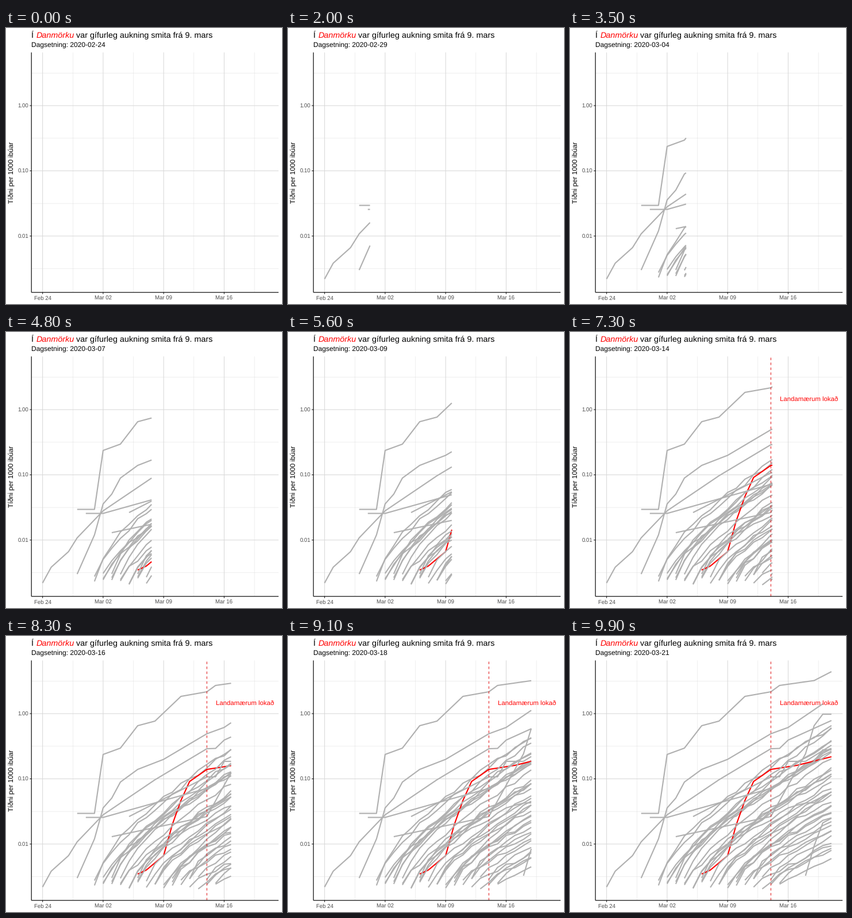
Animation, 480 px wide and 480 px high, one loop 10000 ms. Source, as a matplotlib script:

```python
import numpy as np
import matplotlib.pyplot as plt
from matplotlib.animation import FuncAnimation

plt.rcParams["font.family"] = "Liberation Sans"
plt.rcParams["text.hinting"] = "none"
plt.rcParams["path.snap"] = False

FRAMES, LAST_DAY, CLOSED = 100, 26, 19
LEFT, RIGHT, TOP, BOTTOM = 44.2, 474, 42.5, 459.8
X0, DAY = 63.6, 15.04      # position of Feb 24 and width of one day
Y1, DECADE = 135, 113.4    # height of 1.00 and distance per power of ten
GREY, RED, GRID = "#b0b0b0", "#ff0000", "#d9d9d9"
COUNTRIES = 37
rng = np.random.default_rng(24)

fig = plt.figure(figsize=(480 / 72, 480 / 72), dpi=72, facecolor="white")
ax = fig.add_axes([0, 0, 1, 1])
ax.set(xlim=(0, 480), ylim=(480, 0))
ax.axis("off")


def x_of(day):
    return X0 + DAY * day


def stroke(xs, ys, color, width, z, **kw):
    return ax.plot(xs, ys, color=color, lw=width, zorder=z,
                   solid_capstyle="butt", **kw)[0]


def label(x, y, s, size, color="black", **kw):
    return ax.text(x, y, s, fontsize=size, color=color, zorder=9, **kw)


def vline(x, *style):
    stroke([x, x], [TOP, BOTTOM], *style)


def hline(y, *style):
    stroke([LEFT, RIGHT], [y, y], *style)


# Grid, axes and tick labels
for i in range(4):
    vline(x_of(7 * i + 3.5), GRID, 0.43, 1)
    hline(Y1 + DECADE * (i - 0.5), GRID, 0.43, 1)
for i, name in enumerate(["Feb 24", "Mar 02", "Mar 09", "Mar 16"]):
    x = x_of(7 * i)
    vline(x, GRID, 1.07, 2)
    stroke([x, x], [BOTTOM, BOTTOM + 3], "#333333", 1.16, 7)
    label(x, 472.6, name, 9.6, "#4d4d4d", ha="center")
for i, name in enumerate(["1.00", "0.10", "0.01"]):
    y = Y1 + DECADE * i
    hline(y, GRID, 1.07, 2)
    stroke([LEFT - 3, LEFT], [y, y], "#333333", 1.16, 7)
    label(39.4, y + 3.8, name, 9.6, "#4d4d4d", ha="right")
vline(LEFT, "black", 1.16, 8)
hline(BOTTOM, "black", 1.16, 8)

# Titles
label(44, 17, "Í", 14.4)
label(52.2, 17, "Danmörku", 14.4, RED, style="italic")
label(122.4, 17, "var gífurleg aukning smita frá 9. mars", 14.4)
date = label(44, 34, "", 12)
label(14, 251.5, "Tíðni per 1000 ibúar", 12, rotation=90,
      rotation_mode="anchor", ha="center")

curves = []


def add(days, ys, color=GREY, z=5):
    line = stroke([], [], color, 2.13, z)
    curves.append((line, np.array(days, float), np.array(ys, float)))


def through(*points, **kw):
    """Curve through a few (day, height) points."""
    add(*zip(*points), **kw)


# Curves that stand out from the crowd
through((4, 308.5), (6, 308.5), (7, 206), (9, 195), (11, 156), (13, 148),
        (16, 105), (19, 97), (20, 86), (24, 77.5), (26, 62))
through((4, 421), (6, 353), (7, 299), (8, 282), (9, 254), (11, 232),
        (14, 214.5), (19, 170), (21, 159), (25, 118))
through((0, 436.5), (1, 409), (3, 382), (4, 358), (7, 311), (13, 250),
        (19, 196), (20, 195.5), (21, 181), (26, 147))
through((11, 414), (12, 407), (14, 382), (15, 328), (16, 286), (17, 253),
        (19, 232), (22, 225), (26, 210), color=RED, z=4)
through((5, 315.5), (7, 315.5), (19, 265), (24, 218), (25, 198), (26, 198))
through((10, 314), (19, 245), (20, 245), (21, 218), (23, 218), (26, 190))
through((8, 349), (19, 314), (23, 205), (24, 156), (25, 136), (26, 136))
through((23, 417), (24, 365), (25, 325), (26, 317))

# The crowd: later starts end lower, each curve rises fast and then eases off
for i in range(COUNTRIES):
    k = i / (COUNTRIES - 1)
    days = np.arange(round(6 + 14 * k ** 1.1), LAST_DAY + 1)
    low = rng.uniform(418, 440)
    high = min(160 + 225 * k + rng.uniform(-22, 22), 387)
    u = np.linspace(0, 1, len(days)) ** rng.uniform(0.62, 0.82)
    ys = low + (high - low) * u
    ys[1:-1] += rng.uniform(-4, 4, len(days) - 2)
    add(days, np.minimum.accumulate(ys), z=3 if i % 3 == 0 else 5)

# Border closing, shown once its day is reached
closing = [
    stroke([x_of(CLOSED)] * 2, [BOTTOM, TOP], "#e31a1c", 1.07, 6,
           dashes=(4, 4), dash_capstyle="butt"),
    label(415.3, 120, "Landamærum lokað", 11.38, RED, ha="center"),
]


def draw(i):
    t = LAST_DAY * i / (FRAMES - 1)
    date.set_text(f"Dagsetning: {np.datetime64('2020-02-24') + int(t)}")
    for line, days, ys in curves:
        if t <= days[0]:
            line.set_data([], [])
            continue
        seen = days < t
        end = min(t, days[-1])
        line.set_data(x_of(np.append(days[seen], end)),
                      np.append(ys[seen], np.interp(end, days, ys)))
    for item in closing:
        item.set_visible(t >= CLOSED)
    return []


anim = FuncAnimation(fig, draw, frames=FRAMES, interval=100,
                     repeat=True, repeat_delay=0)
plt.show()
```
